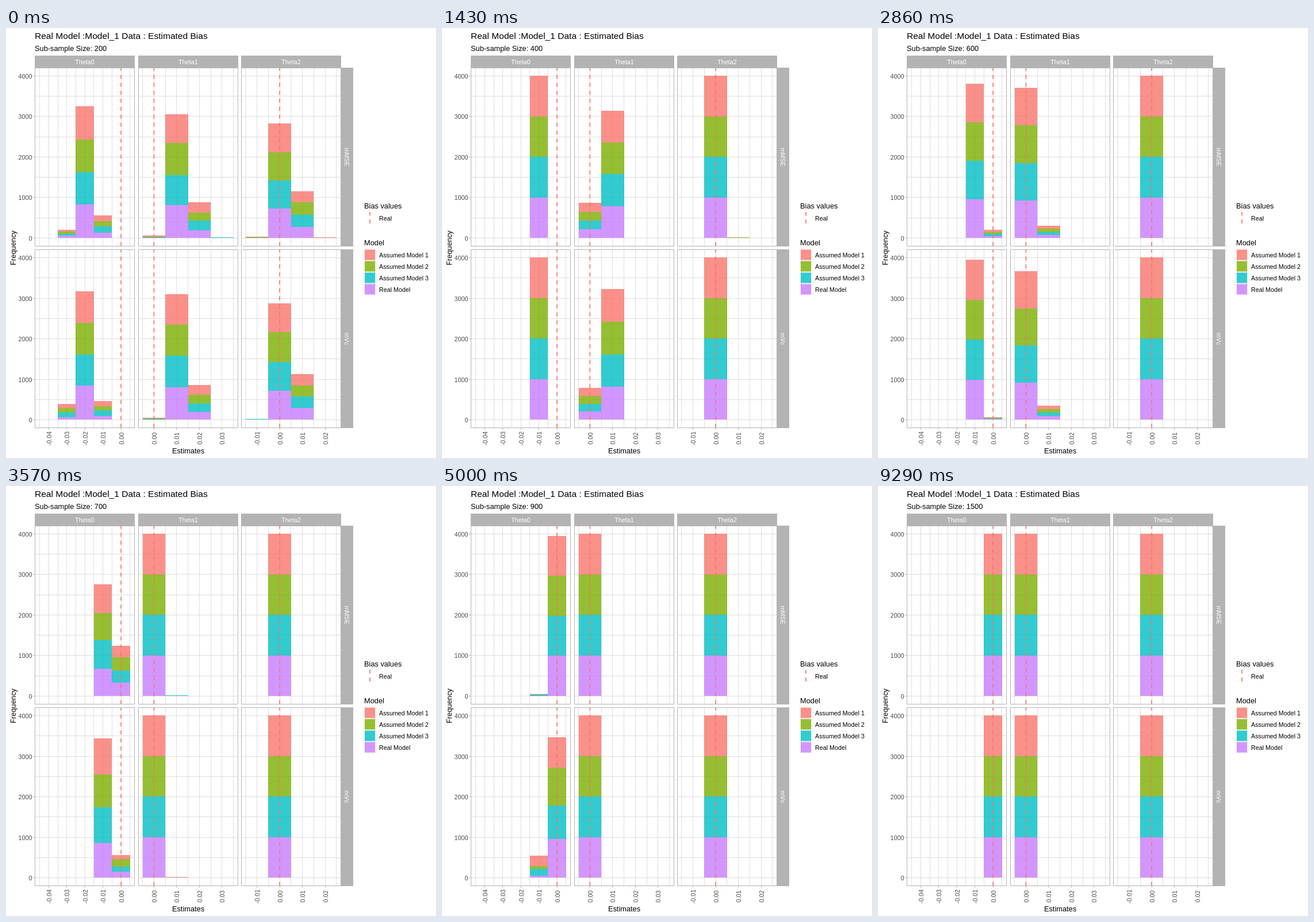
Write an HTML page that moves like this. It is 748x748 px and loops after 10000 ms.

```html
<!DOCTYPE html>
<html lang="en">
<head>
<meta charset="utf-8">
<title>Estimated Bias</title>
<style>
  html, body { margin: 0; width: 100%; height: 100%; overflow: hidden; background: #fff; }
  svg { display: block; width: 748px; height: 748px; font: 10.75px "Liberation Sans", Arial, sans-serif; }
  .heading { font-size: 12.8px; }
  .axis { fill: #4d4d4d; }
  .strip { fill: #fff; }
  .grid { stroke: #dedede; shape-rendering: crispEdges; }
  .edge { stroke: #b3b3b3; fill: none; shape-rendering: crispEdges; }
  .bias { stroke: #f8766d; stroke-width: 1.73; stroke-dasharray: 6.93; }
  .key { fill-opacity: .8; }
  .bar { fill-opacity: .8; shape-rendering: crispEdges; }
</style>
</head>
<body>
<svg id="stage" viewBox="0 0 748 748"></svg>
<script>
const LOOP = 10000;
const RUNS = 1000;
const UNIT = 0.0705;
const GREY = '#b3b3b3';
const COLORS = ['#c77cff', '#00bfc4', '#7cae00', '#f8766d']; // stacked from the bottom
const LABELS = ['Real Model', 'Assumed Model 3', 'Assumed Model 2', 'Assumed Model 1'];
const COLUMNS = [
  { left: 50, right: 223, zero: 200.1, bin: 31.45 },
  { left: 230, right: 403, zero: 257.3, bin: 39.55 },
  { left: 409, right: 582, zero: 476.1, bin: 39.5 }
];
const ROWS = [
  { name: 'mMSE', top: 69, bottom: 379, zero: 365.4, base: 365.1 },
  { name: 'mVc', top: 385, bottom: 695, zero: 681.6, base: 681.2 }
];

// A panel lists some bins; every model's remaining runs fall in the bin "rest".
const panel = (rest, ...bins) => ({ rest, bins });
const few = model => COLORS.map((_, i) => i === model ? 4 : 0);
const settled = panel(0);

// Per step: the three upper panels, then the three lower ones.
const STEPS = [
  [
    panel(-1, [-3, [52, 47, 53, 50]], [-2, [824, 797, 809, 820]]),
    panel(2, [0, [5, 5, 25, 25]], [1, [812, 740, 790, 710]], [3, few(1)]),
    panel(1, [-1, [0, 3, 8, 4]], [0, [725, 700, 690, 710]], [2, few(3)]),
    panel(-1, [-3, [65, 110, 105, 100]], [-2, [840, 760, 790, 770]]),
    panel(2, [0, [5, 18, 15, 12]], [1, [803, 772, 773, 750]]),
    panel(1, [-1, few(1)], [0, [717, 710, 725, 715]])
  ],
  [
    panel(-2, [-1, [930, 880, 910, 910]]),
    panel(0, [1, [957, 960, 945, 957]], [2, few(1)]),
    panel(1, [0, [967, 943, 937, 955]]),
    panel(-2, [-1, [835, 765, 835, 747]]),
    panel(0, [1, [965, 960, 950, 960]]),
    panel(1, [0, [965, 945, 970, 940]])
  ],
  [panel(-1), panel(1, [0, 215]), panel(0, [1, few(2)]), panel(-1), panel(1, [0, 195]), settled],
  [
    panel(-1, [0, few(0)]), panel(1, [0, [662, 530, 660, 543]]), settled,
    panel(-1), panel(1, [0, [595, 570, 600, 575]]), settled
  ],
  [panel(-1, [0, 50]), panel(0, [1, 75]), settled, panel(-1, [0, 15]), panel(0, [1, 85]), settled],
  [
    panel(0, [-1, [675, 702, 670, 713]]), panel(0, [1, few(1)]), settled,
    panel(0, [-1, [850, 880, 815, 895]]), panel(0, [1, few(3)]), settled
  ],
  [panel(0, [-1, 185]), settled, settled, panel(0, [-1, [400, 590, 400, 680]]), settled, settled],
  [
    panel(0, [-1, [5, 20, 10, 15]]), settled, settled,
    panel(0, [-1, [45, 175, 65, 250]]), settled, settled
  ],
  [settled, settled, settled, panel(0, [-1, [5, 30, 10, 60]]), settled, settled]
];
const STEP_COUNT = 14;
const STARTS = Array.from({ length: STEP_COUNT }, (_, i) => Math.round(i * LOOP / STEP_COUNT / 10) * 10);

const stage = document.getElementById('stage');

function add(parent, tag, attrs, text) {
  const node = document.createElementNS('http://www.w3.org/2000/svg', tag);
  for (const key in attrs) node.setAttribute(key, attrs[key]);
  if (text !== undefined) node.textContent = text;
  parent.append(node);
  return node;
}
const line = (cls, x1, y1, x2, y2) => add(stage, 'line', { class: cls, x1, y1, x2, y2 });
const rect = (parent, x, y, width, height, attrs) => add(parent, 'rect', { x, y, width, height, ...attrs });
const label = (text, x, y, cls = '', anchor = 'start', angle = 0) => add(stage, 'text', {
  class: cls, 'text-anchor': anchor, transform: `translate(${x} ${y}) rotate(${angle})`
}, text);
const crisp = v => Math.floor(v) + 0.5;

rect(stage, 0, 0, 748, 748, { fill: '#fff' });
ROWS.forEach(row => {
  COLUMNS.forEach(col => {
    for (let n = 0; n <= 4000; n += 500) {
      const y = crisp(row.zero - n * UNIT);
      line('grid', col.left, y, col.right, y);
    }
    for (let b = -5; b <= 4; b += 0.5) {
      const x = crisp(col.zero + b * col.bin);
      if (x > col.left && x < col.right) line('grid', x, row.top, x, row.bottom);
    }
  });
});

const bars = add(stage, 'g', {});

ROWS.forEach(row => {
  COLUMNS.forEach(col => {
    line('bias', col.zero, row.bottom + 0.5, col.zero, row.top);
    rect(stage, col.left + 0.5, row.top + 0.5, col.right - col.left, row.bottom - row.top, { class: 'edge' });
  });
  for (let n = 0; n <= 4000; n += 1000) {
    const y = crisp(row.zero - n * UNIT);
    line('edge', 47, y, 50, y);
    label(n, 45.5, y + 4, 'axis', 'end');
  }
  rect(stage, 583, row.top, 21, row.bottom - row.top + 1, { fill: GREY });
  label(row.name, 588.5, (row.top + row.bottom) / 2 + 0.5, 'strip', 'middle', 90);
});
COLUMNS.forEach((col, i) => {
  rect(stage, col.left, 48, col.right - col.left + 1, 21, { fill: GREY });
  label('Theta' + i, (col.left + col.right) / 2 + 0.5, 63, 'strip', 'middle');
  for (let b = -4; b <= 3; b++) {
    const x = crisp(col.zero + b * col.bin);
    if (x < col.left || x > col.right) continue;
    line('edge', x, 696, x, 699);
    label((b / 100).toFixed(2), x + 4, 714, 'axis', 'middle', -90);
  }
});

label('Real Model :Model_1 Data : Estimated Bias', 50, 19).style.fontSize = '15.55px';
const subtitle = label('', 50, 40, 'heading');
label('Estimates', 317, 740, 'heading', 'middle');
label('Frequency', 17, 382.5, 'heading', 'middle', -90);
label('Bias values', 623, 313.5, 'heading');
line('bias', 633, 340, 633, 320);
label('Real', 649, 335);
label('Model', 623, 377.5, 'heading');
LABELS.forEach((name, i) => {
  const y = 445.4 - i * 20;
  rect(stage, 623.9, y, 18.3, 18.3, { class: 'key', fill: COLORS[i] });
  label(name, 649, y + 13.6);
});

function drawStack(col, row, bin, counts) {
  const left = Math.round(col.zero + (bin - 0.5) * col.bin);
  const right = Math.round(col.zero + (bin + 0.5) * col.bin);
  let sum = 0;
  counts.forEach((count, i) => {
    if (count <= 0) return;
    const bottom = Math.round(row.base - sum * UNIT);
    sum += count;
    const height = Math.max(1, bottom - Math.round(row.base - sum * UNIT));
    rect(bars, left, bottom - height, right - left, height, { class: 'bar', fill: COLORS[i] });
  });
}

function drawStep(step) {
  subtitle.textContent = 'Sub-sample Size: ' + (200 + step * 100);
  bars.replaceChildren();
  for (let i = 0; i < 6; i++) {
    const { rest, bins } = STEPS[step] ? STEPS[step][i] : settled;
    const col = COLUMNS[i % 3], row = ROWS[Math.floor(i / 3)];
    const left = COLORS.map(() => RUNS);
    bins.forEach(([bin, value]) => {
      const counts = COLORS.map((_, m) => Array.isArray(value) ? value[m] : value);
      counts.forEach((count, m) => left[m] -= count);
      drawStack(col, row, bin, counts);
    });
    drawStack(col, row, rest, left);
  }
}

const begin = performance.now();
let shown = -1;
function tick() {
  const time = (performance.now() - begin) % LOOP;
  const step = STARTS.filter(start => start <= time).length - 1;
  if (step !== shown) drawStep(shown = step);
  requestAnimationFrame(tick);
}
tick();
</script>
</body>
</html>
```
